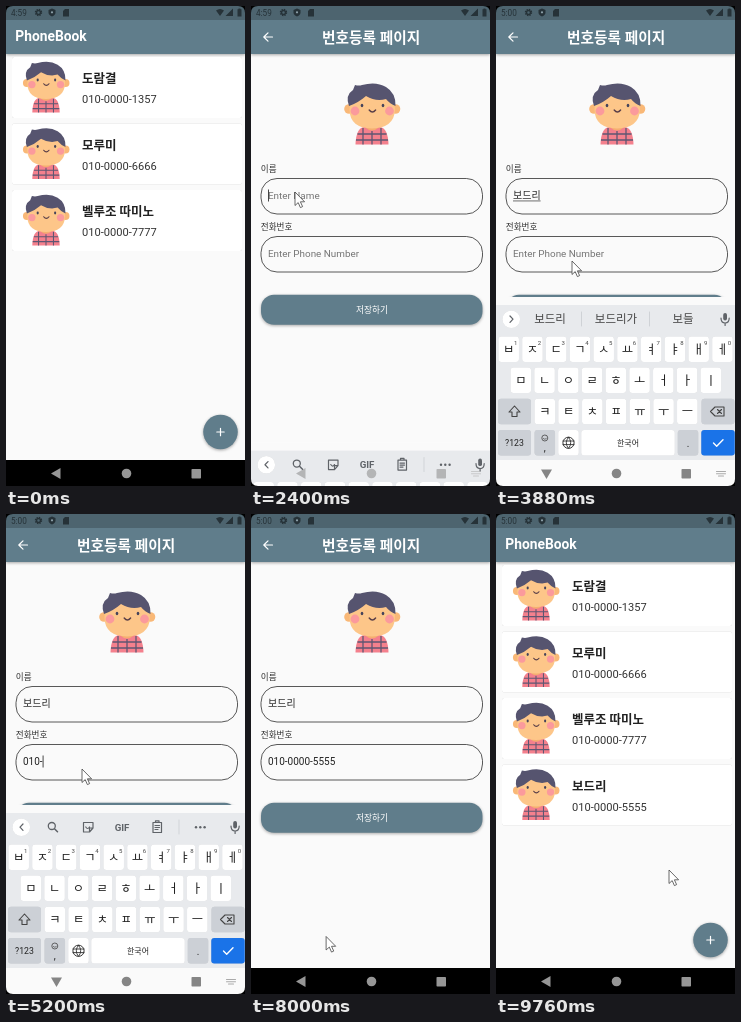
Write an HTML page that moves like this. It is 239x480 px and loops after 9800 ms.

```html
<!DOCTYPE html>
<html lang="ko">
<head>
<meta charset="utf-8">
<title>PhoneBook</title>
<style>
html, body { margin: 0; width: 100%; height: 100%; overflow: hidden; background: #fafafa; }
svg { display: block; width: 100vw; height: 100vh; }
text { font-family: Roboto, "Noto Sans CJK KR", "Noto Sans CJK", sans-serif; white-space: pre; }
.bold { font-weight: 700; }
.mid { text-anchor: middle; }
.card { filter: drop-shadow(0 .6px .7px #0003); }
.key { filter: drop-shadow(0 .5px .3px #0002); }
.raised { filter: drop-shadow(0 1.5px 1.6px #0005); }
.line { fill: none; stroke-linecap: round; stroke-linejoin: round; }
</style>
</head>
<body>
<svg id="stage" viewBox="0 0 239 480">
  <defs>
    <g id="avatar">
      <circle cx="-23" cy="24" r="4.8" fill="#f9b877"/>
      <circle cx="23.5" cy="24" r="4.8" fill="#f9b877"/>
      <path d="M-16.5 59.5Q-16 43-8 42H8Q16 43 16.5 59.5Z" fill="#f4808d"/>
      <path d="M-14.5 49H14.5M-16 55H16M-9 43V59.5M0 46V59.5M9 43V59.5" stroke="#5f5672" stroke-width="1.3"/>
      <path d="M-6 38H6V43Q0 48-6 43Z" fill="#f5ae70"/>
      <path d="M-22 14Q0 2 22.5 14L23 25Q22 43 0 43.5Q-22 43-22.5 25Z" fill="#fdc689"/>
      <path d="M-23 21Q-27 10-19 5L-17 0Q-13 1-10 0Q4-4 14 2Q24 8 23.5 21Q18 19 14 14Q4 17-6 11Q-14 18-23 21Z" fill="#56546f"/>
      <circle cx="-17" cy="26" r="4.4" fill="#fb9a9c"/>
      <circle cx="17.5" cy="26" r="4.4" fill="#fb9a9c"/>
      <ellipse cx="-10" cy="20.5" rx="1.3" ry="1.8" fill="#45435a"/>
      <ellipse cx="11" cy="20.5" rx="1.3" ry="1.8" fill="#45435a"/>
      <path d="M-2.8 25Q.4 29 3.6 25" class="line" stroke="#5a3f48" stroke-width="1.4"/>
    </g>
  </defs>
</svg>
<script>
const LOOP = 9800, PRIMARY = '#607d8b', PAPER = '#fafafa';
const stage = document.getElementById('stage');

const rect = (x, y, w, h, r, fill, extra = '') =>
  `<rect x="${x}" y="${y}" width="${w}" height="${h}" rx="${r}" fill="${fill}" ${extra}/>`;
const text = (x, y, size, fill, content, extra = '') =>
  `<text x="${x}" y="${y}" font-size="${size}" fill="${fill}" ${extra}>${content}</text>`;
const circle = (x, y, r, fill, extra = '') =>
  `<circle cx="${x}" cy="${y}" r="${r}" fill="${fill}" ${extra}/>`;
const line = (d, color, width = 1.2) =>
  `<path d="${d}" class="line" stroke="${color}" stroke-width="${width}"/>`;
const group = (id, content) => `<g id="${id}">${content}</g>`;

// Pages
const contacts = [
  ['도람결', '010-0000-1357'],
  ['모루미', '010-0000-6666'],
  ['벨루조 따미노', '010-0000-7777'],
  ['보드리', '010-0000-5555'],
];

const appBar = rect(0, 0, 239, 48, 0, PRIMARY, 'class="raised"');

const card = ([name, phone], i) => `<g transform="translate(0 ${i * 66.5})">
  ${rect(6, 51, 230, 61, 2.5, '#fff', 'class="card"')}
  <use href="#avatar" transform="translate(40 57) scale(.83)"/>
  ${text(76, 77, 12.5, '#222', name, 'class="bold"')}
  ${text(76, 97.2, 11.1, '#333', phone)}</g>`;

const listPage = count => rect(0, 0, 239, 480, 0, PAPER) + appBar
  + text(9.3, 35, 13.8, '#fff', 'PhoneBook', 'class="bold"')
  + contacts.slice(0, count).map(card).join('')
  + circle(214.5, 426, 17.3, PRIMARY, 'class="raised"')
  + line('M210.8 426H218.2M214.5 422.3V429.7', '#fff', 1.2);

const field = (id, y, label, hint) =>
  text(9.8, y - 6.5, 8.6, '#333', label)
  + rect(10, y, 221.5, 35.5, 16, 'none', 'stroke="#222" stroke-width=".75"')
  + text(17, y + 20.4, 9.9, '#757575', hint, `id="${id}Hint"`)
  + text(17, y + 20.4, 10, '#222', '', `id="${id}Text"`)
  + rect(17, y + 11, 0.9, 12, 0, '#333', `id="${id}Caret"`);

const formPage = rect(0, 0, 239, 480, 0, PAPER) + appBar
  + group('arrow', line('M21.5 31H13M17 26.8L12.8 31L17 35.2', '#fff', 1.2))
  + text(120.2, 37, 14.7, '#fff', '번호등록 페이지', 'class="bold mid"')
  + '<use href="#avatar" transform="translate(121 79)"/>'
  + field('name', 172.5, '이름', 'Enter Name')
  + rect(17, 194.6, 28, 0.7, 0, '#333', 'id="underline"')
  + field('phone', 230.5, '전화번호', 'Enter Phone Number')
  + rect(10, 288.7, 221.5, 30, 13, PRIMARY, 'class="raised"')
  + text(121, 307, 8.7, '#fff', '저장하기', 'class="mid"');

// Keyboard
const INK = '#5f6368', SOFT = '#ccd0d6';
const key = (cx, cy, w, label = '', fill = '#fff', size = 12.3) =>
  rect(cx - w / 2, cy - 12.8, w, 25.6, 3, fill, 'class="key"')
  + text(cx, cy + size * 0.37, size, '#222', label, 'class="mid"');
const keyRow = (letters, x, y) =>
  [...letters].map((c, i) => key(x + i * 23.75, y, 20.5, c)).join('');
const digits = [...'1234567890'].map((d, i) =>
  text(19.6 + i * 23.75, 338.5, 6, '#444', d, 'class="mid"')).join('');

const mic = rect(227.2, 307, 3.8, 7.5, 1.9, INK) + line('M225 312Q225 317 229.1 317T233.2 312M229.1 317V319.5', INK);
const tools = line('M17 310L14 313.2L17 316.4', INK)
  + circle(45.8, 312, 3.5, 'none', `stroke="${INK}" stroke-width="1.3"`) + line('M48.5 314.7L51.5 317.7', INK, 1.5)
  + line('M77.5 308.5H87V314L83.5 318H77.5ZM87 314H83.5V318M79.8 313Q81.5 316 83.5 313', INK, 1.2)
  + text(116, 316.6, 9.7, INK, 'GIF', 'class="bold mid"')
  + line('M147 308.5H155.5V318.5H147ZM149.5 308V306.8H153V308M149 311.5H153.5M149 313.5H153.5M149 315.5H152', INK, 1.2)
  + line('M173 306V320', '#c8ccd0', 0.7)
  + [190, 194.3, 198.6].map(x => circle(x, 313.2, 1.2, INK)).join('');
const suggestions = line('M14 310L17 313.2L14 316.4', INK)
  + line('M85.5 306V320M153.5 306V320', '#c4c8cc', 0.7)
  + [54, 120, 187].map(x => text(x, 317.3, 11.5, '#444', '', 'class="mid suggestion"')).join('');

const keyboard = rect(0, 291, 239, 8.5, 0, PAPER)
  + rect(0, 299, 239, 156, 0, '#e8eaed') + rect(0, 454, 239, 30, 0, PAPER)
  + circle(15.3, 313.2, 8.8, '#fff', 'class="key"')
  + group('tools', tools) + group('suggestions', suggestions) + mic
  + keyRow('ㅂㅈㄷㄱㅅㅛㅕㅑㅐㅔ', 12.7, 343.3) + digits
  + keyRow('ㅁㄴㅇㄹㅎㅗㅓㅏㅣ', 24.8, 374.3)
  + keyRow('ㅋㅌㅊㅍㅠㅜㅡ', 48.8, 405.5)
  + key(18.5, 405.5, 33, '', SOFT) + line('M18.5 400L13 406H16V410.5H21V406H24Z', '#444', 1.1)
  + key(222, 405.5, 33, '', SOFT) + line('M219 401H228V410H219L214.5 405.5ZM221.5 403.5L225.5 407.5M225.5 403.5L221.5 407.5', '#444', 1.1)
  + key(18.5, 436.8, 33, '?123', SOFT, 8.7)
  + key(48.8, 436.8, 20.5, '', SOFT) + text(48.8, 444.5, 10, '#222', ',', 'class="mid"')
  + circle(48.8, 432, 3, 'none', 'stroke="#444" stroke-width=".8"') + line('M47.3 432.6Q48.8 434.2 50.3 432.6', '#444', 0.7)
  + key(72.5, 436.8, 20.5)
  + circle(72.5, 436.8, 5.6, 'none', 'stroke="#333"') + line('M67 435H78M67 438.6H78M72.5 431.2Q68 436.8 72.5 442.4Q77 436.8 72.5 431.2', '#333', 0.9)
  + key(132, 436.8, 93.5, '한국어', '#fff', 8)
  + key(192, 436.8, 20.5, '.', SOFT, 10)
  + key(222, 436.8, 33.5, '', '#1a73e8') + line('M217.5 437L220.7 440.2L227 433.8', '#fff', 1.4);

// System bars
const STATUS = '#263238';
const statusBar = rect(0, 0, 239, 14, 0, '#0003')
  + text(5, 9.6, 8.2, STATUS, '', 'id="clock"')
  + circle(32.5, 6.5, 2.9, 'none', `stroke="${STATUS}" stroke-width="1.6" stroke-dasharray="1.3 .98"`)
  + circle(32.5, 6.5, 2, 'none', `stroke="${STATUS}" stroke-width="1.5"`)
  + `<path d="M46 2.5L49.5 4V6.5Q49.5 9.2 46 10.5Q42.5 9.2 42.5 6.5V4Z" fill="${STATUS}"/>` + circle(46, 6.3, 1.1, '#8fa2ab')
  + `<path d="M59 3H63V10.5H57V5ZM210 4.5Q214 1.5 218 4.5L214 10ZM227 2.5V10H219.5ZM231.5 3.2H232.5V2.4H234.5V3.2H235.5V10.5H231.5Z" fill="${STATUS}"/>`;

const navBar = rect(0, 454, 239, 26, 0, '#000', 'id="navBack"')
  + group('navIcons', '<path id="back" d="M45 467.5L54.5 462V473Z"/>'
    + '<circle cx="120.5" cy="467.5" r="4.8"/><rect x="185.5" y="463" width="9.5" height="9.5" rx=".8"/>')
  + group('keyboardIcon', line('M220.5 465.5H229.5M220.5 467.7H229.5M222.5 470H227.5', '#aaa', 1.1));

// Rounded corners of the phone screen
const corners = '<path d="M0 0H239V480H0ZM7 0Q0 0 0 7V473Q0 480 7 480H232Q239 480 239 473V7Q239 0 232 0Z" fill-rule="evenodd"/>';

stage.insertAdjacentHTML('beforeend',
  group('firstList', listPage(3)) + group('form', formPage) + group('lastList', listPage(4))
  + statusBar + group('keyboard', keyboard) + navBar + corners
  + '<path id="pointer" d="M0 0V13.5L3.2 10.6L5.4 15.6L7.6 14.6L5.4 9.8H9.6Z" fill="#fff" stroke="#444" stroke-width=".8" stroke-linejoin="round"/>');

const ui = {};
document.querySelectorAll('[id]').forEach(el => ui[el.id] = el);
const suggestionTexts = document.querySelectorAll('.suggestion');

// Motion
const clamp = v => Math.max(0, Math.min(1, v));
const bezier = (x1, y1, x2, y2) => x => {
  const at = (s, a, b) => 3 * (1 - s) ** 2 * s * a + 3 * (1 - s) * s * s * b + s ** 3;
  let low = 0, high = 1;
  for (let i = 0; i < 20; i++) {
    const mid = (low + high) / 2;
    if (at(mid, x1, x2) < x) low = mid; else high = mid;
  }
  return at(high, y1, y2);
};
const fastOutSlowIn = bezier(.4, 0, .2, 1);
const easeIn = bezier(.42, 0, 1, 1);
const smooth = p => p * p * (3 - 2 * p);

const FORM_OPEN = 1465, NAME_FOCUS = 2200, PHONE_FOCUS = 4060, SAVED = 8600;
const nameEdits = [[NAME_FOCUS, ''], [2640, 'ㅂ'], [2720, '보'], [2840, '볻'],
  [2960, '보드'], [3120, '보들'], [3240, '보드리']];
const phoneTimes = [4920, 5000, 5080, 5200, 6120, 6240, 6360, 6520, 6600, 6720, 6880, 7000, 7120];
const phoneEdits = [[PHONE_FOCUS, ''],
  ...phoneTimes.map((t, i) => [t, contacts[3][1].slice(0, i + 1)])];

const pointerPath = [[200, 242, 385], [440, 199, 410], [600, 199, 410], [840, 211, 424],
  [1360, 211, 424], [1600, 165, 373], [2080, 44, 186], [3680, 44, 186], [3880, 76, 255],
  [7280, 76, 255], [7640, 49, 465], [7840, 49, 465], [8280, 135, 325], [8400, 132, 307],
  [8860, 132, 307], [9600, 173, 356]];

const show = (el, visible) => el.style.display = visible ? '' : 'none';
const lastEdit = (edits, t) => edits.filter(e => e[0] <= t).pop() || edits[0];

function enterPage(page, t, start) {
  const p = clamp((t - start) / 300);
  show(page, p > 0);
  page.setAttribute('transform', `translate(0 ${120 * (1 - fastOutSlowIn(p))})`);
  page.setAttribute('opacity', easeIn(p));
}

function drawField(id, edits, t, focused) {
  const [time, value] = lastEdit(edits, t);
  const label = ui[id + 'Text'], caret = ui[id + 'Caret'];
  label.textContent = value;
  show(ui[id + 'Hint'], !value);
  show(caret, focused && Math.floor((t - time) / 500) % 2 === 0);
  const width = value ? label.getComputedTextLength() : 0;
  caret.setAttribute('x', 17 + width);
  return [value, width];
}

function drawPointer(t) {
  let i = pointerPath.findIndex(p => p[0] > t);
  if (i < 0) i = pointerPath.length;
  const a = pointerPath[Math.max(0, i - 1)], b = pointerPath[i] || a;
  const p = b === a ? 0 : smooth((t - a[0]) / (b[0] - a[0]));
  show(ui.pointer, t >= 200);
  ui.pointer.setAttribute('transform',
    `translate(${a[1] + (b[1] - a[1]) * p} ${a[2] + (b[2] - a[2]) * p})`);
}

function drawKeyboard(t, word) {
  const rise = fastOutSlowIn(clamp((t - 2336) / 280)) - fastOutSlowIn(clamp((t - 7700) / 260));
  const open = rise > 0.001, suggesting = word !== '' && t < PHONE_FOCUS;
  show(ui.keyboard, open);
  show(ui.navBack, !open);
  show(ui.keyboardIcon, open);
  show(ui.tools, !suggesting);
  show(ui.suggestions, suggesting);
  ui.keyboard.setAttribute('transform', `translate(0 ${181 * (1 - rise)})`);
  ui.navIcons.setAttribute('fill', open ? '#858585' : '#969696');
  const fade = open ? 0.4 + 0.6 * rise : 1;
  ui.navIcons.setAttribute('opacity', fade);
  ui.keyboardIcon.setAttribute('opacity', fade);
  ui.back.setAttribute('transform', rise > 0.5 ? 'rotate(-90 50.5 467.5)' : '');
  const options = [word, word + '가', '보들'];
  suggestionTexts.forEach((el, i) => el.textContent = options[i]);
}

function draw(t) {
  enterPage(ui.form, t, FORM_OPEN);
  enterPage(ui.lastList, t, SAVED);
  show(ui.arrow, t < SAVED);
  ui.clock.textContent = t < 3520 ? '4:59' : '5:00';
  const [word, width] = drawField('name', nameEdits, t, t >= NAME_FOCUS && t < PHONE_FOCUS);
  drawField('phone', phoneEdits, t, t >= PHONE_FOCUS);
  show(ui.underline, word && t < PHONE_FOCUS);
  ui.underline.setAttribute('width', width);
  drawKeyboard(t, word);
  drawPointer(t);
}

const started = performance.now();
function tick() {
  draw((performance.now() - started) % LOOP);
  requestAnimationFrame(tick);
}
tick();
</script>
</body>
</html>
```
